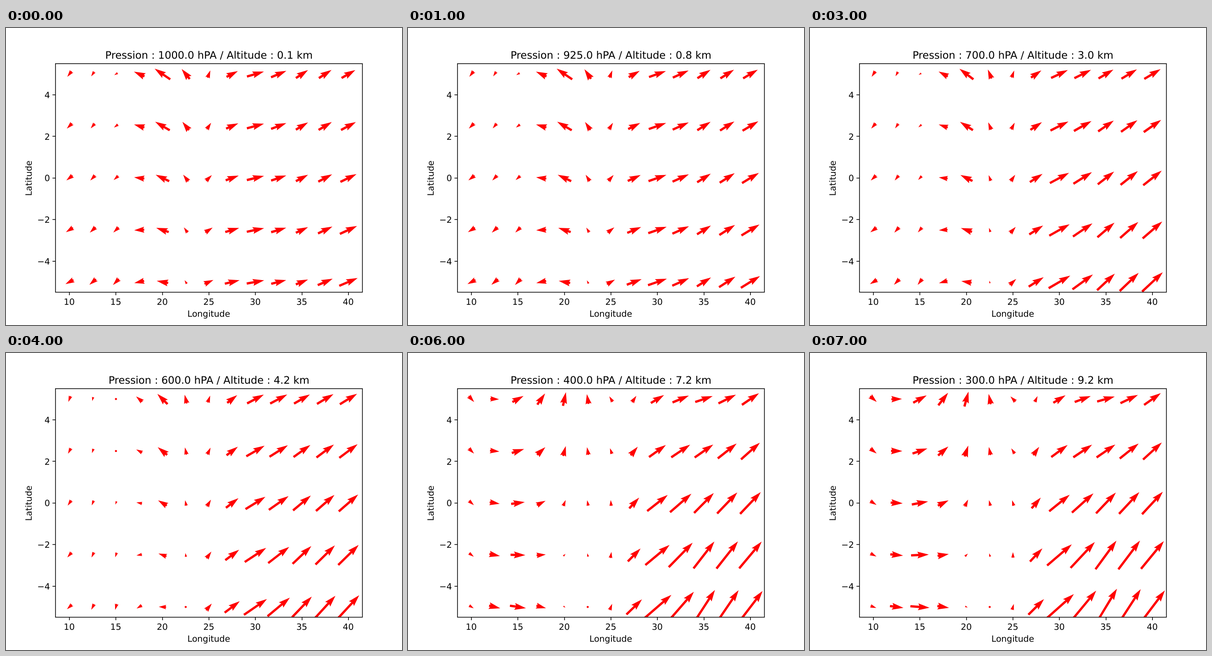
Animation, 864 px wide and 648 px high, one loop 8000 ms. Source, as an HTML page:

```html
<!DOCTYPE html>
<html lang="fr">
<head>
<meta charset="utf-8">
<title>Wind field by pressure level</title>
<style>
  html, body { margin: 0; width: 100%; height: 100%; overflow: hidden; background: #fff; }
  svg { display: block; width: 864px; height: 648px; }
  text { font: 18.75px "DejaVu Sans", sans-serif; text-anchor: middle; text-rendering: geometricPrecision; }
  .title { font-size: 22.5px; }
  .end { text-anchor: end; }
  .axis { fill: none; stroke: #000; stroke-width: 1.5; }
  .wind { fill: #f00; }
</style>
</head>
<body>
<svg id="stage" viewBox="0 0 864 648">
  <clipPath id="plot"><rect x="108" y="77.76" width="669.6" height="498.96"/></clipPath>
</svg>
<script>
const STEP = 1000;
const SHAFT = 4.98; // shaft width in px; the head is 3 wide and 5 long in this unit
const px = lon => 108 + (lon - 8.5) * 669.6 / 33;
const py = lat => 327.24 - lat * 45.36;
const snap = v => Math.round(v / .675) * .675; // the plot's own line grid

// Key winds every 5 degrees from 10E to 40E, as half arrows (x, y up):
// first at 5N, then at 5S.
const low = [
  [-4.7, -6, -8.7, -4.6], [-3.6, -2.2, -6.5, -6.6], [-17, 11.6, -12.5, 2.3], [3, 8, 9.7, 4.3],
  [18.5, 5.5, 19, 3.5], [13.2, 8.8, 13.3, 5.3], [15, 8.7, 20, 8.5]
];
const middle = [
  [1.7, -7, .2, -5.5], [3.6, 1.9, 6.4, -6.3], [-1, 10.3, -.3, -3], [2.5, 7.4, 5.2, 8],
  [18.1, 10.8, 26.8, 21.1], [18.4, 10.3, 23.8, 27.4], [19.8, 12.1, 24.4, 30.2]
];
const high = [
  [5.9, -6.5, 4.9, -3], [12.1, 6.6, 17.5, -2.7], [3.2, 14.9, 2, -1.8], [-3.6, 6, 2.6, 6.8],
  [14.4, 8.8, 30.4, 26.4], [19, 6.5, 24, 37], [18.6, 12.7, 26.5, 34.7]
];
const keys = [low, middle, high];

// Pressure and how far the wind has moved through the keys.
const levels = [[1000, 0], [925, .2], [850, .38], [700, .58], [600, .78], [500, 1], [400, 2], [300, 2.3]];
const altitude = p => 44.33 * (1 - (p / 1013.25) ** .1903);

const mix = (a, b, t) => a + (b - a) * t;
const spline = (a, b, c, d, t) =>
  b + t / 2 * (c - a + t * (2 * a - 5 * b + 4 * c - d + t * (3 * (b - c) + d - a)));

// Smooth curve through a key's points; s counts steps of 5 degrees.
function sample(key, s, n) {
  const i = Math.min(Math.floor(s), key.length - 2);
  const at = j => key[Math.max(0, Math.min(key.length - 1, j))][n];
  return spline(at(i - 1), at(i), at(i + 1), at(i + 2), s - i);
}

function wind(lon, lat, progress) {
  // Western winds turn later with height than eastern ones.
  const p = progress < 1 && lon < 22 ? progress ** 4 : progress;
  const k = p < 1 ? 0 : 1, s = (lon - 10) / 5;
  const part = n => mix(sample(keys[k], s, n), sample(keys[k + 1], s, n), p - k);
  const south = (5 - lat) / 10;
  return [mix(part(0), part(2), south), mix(part(1), part(3), south)];
}

// Arrow centred on (cx, cy) with half vector (hx, hy).
function arrow(cx, cy, [hx, hy]) {
  const len = 2 * Math.hypot(hx, hy) / SHAFT;
  let pts, angle = Math.atan2(hy, hx), s = SHAFT;
  if (len < 1) {
    pts = [0, 1, 2, 3, 4, 5].map(i => [Math.cos(i * Math.PI / 3) / 2, Math.sin(i * Math.PI / 3) / 2]);
    angle = 0;
  } else {
    const m = Math.max(len, 5) / 2;
    if (len < 5) s *= len / 5;
    pts = [[-m, .5], [m - 4.5, .5], [m - 5, 1.5], [m, 0], [m - 5, -1.5], [m - 4.5, -.5], [-m, -.5]];
  }
  const c = Math.cos(angle) * s, n = Math.sin(angle) * s;
  return "M" + pts.map(([x, y]) =>
    (cx + x * c - y * n).toFixed(2) + " " + (cy - x * n - y * c).toFixed(2)).join("L") + "Z";
}

function field(progress) {
  let d = "";
  for (let lon = 10; lon <= 40; lon += 2.5)
    for (let lat = -5; lat <= 5; lat += 2.5)
      d += arrow(px(lon), py(lat), wind(lon, lat, progress));
  return d;
}

const stage = document.getElementById("stage");
function add(parent, tag, attrs, text) {
  const el = document.createElementNS("http://www.w3.org/2000/svg", tag);
  for (const k in attrs) el.setAttribute(k, attrs[k]);
  if (text) el.textContent = text;
  return parent.appendChild(el);
}

const scenes = levels.map(([p, progress]) => {
  const g = add(stage, "g", { opacity: 0 });
  add(g, "text", { class: "title", x: 442.8, y: 66.5 },
    `Pression : ${p.toFixed(1)} hPA / Altitude : ${altitude(p).toFixed(1)} km`);
  add(g, "path", { class: "wind", "clip-path": "url(#plot)", d: field(progress) });
  return g;
});

const left = snap(108), right = snap(777.6), top_ = snap(77.76), bottom = snap(576.72);
let lines = `M${left} ${top_}H${right}V${bottom}H${left}Z`;
for (let lon = 10; lon <= 40; lon += 5) {
  lines += `M${snap(px(lon))} ${bottom}v6.56`;
  add(stage, "text", { x: px(lon) - .4, y: 604.4 }, String(lon));
}
for (let lat = -4; lat <= 4; lat += 2) {
  lines += `M${left} ${snap(py(lat))}h-6.56`;
  add(stage, "text", { class: "end", x: 96, y: snap(py(lat) + 7.1) }, (lat < 0 ? "\u2212" : "") + Math.abs(lat));
}
add(stage, "path", { class: "axis", d: lines });
add(stage, "text", { x: 442.4, y: 630.4 }, "Longitude");
add(stage, "text", { transform: "translate(56.2 327.7) rotate(-90)" }, "Latitude");

const share = 1 / scenes.length, loop = STEP * scenes.length;
scenes.forEach((g, i) => g.animate([
  { opacity: 1, offset: 0 },
  { opacity: 1, offset: share },
  { opacity: 0, offset: share },
  { opacity: 0, offset: 1 }
], { duration: loop, delay: i * STEP - loop, iterations: Infinity }));
</script>
</body>
</html>
```
